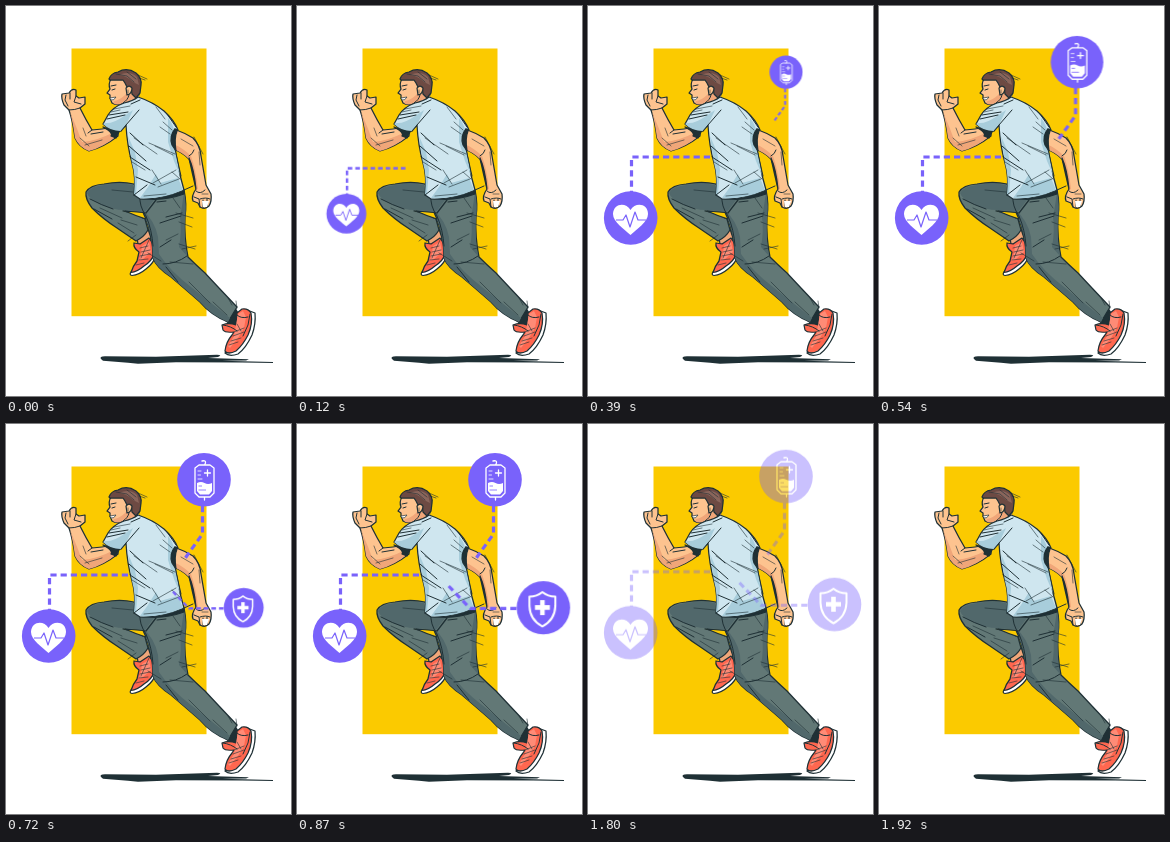
An HTML page that plays this animation: 285 by 390 pixels, repeating every 1950 ms.

```html
<!DOCTYPE html>
<html lang="en">
<head>
<meta charset="utf-8">
<title>Runner with health badges</title>
<style>
  html, body { margin: 0; width: 100%; height: 100%; overflow: hidden; background: #fff; }
  svg { display: block; width: 100%; height: 100%; }

  .ink path { stroke: #1f3035; stroke-width: 1.25; stroke-linejoin: round; stroke-linecap: round; }
  .ink .flat { stroke: none; }
  .ink .line { fill: none; stroke-width: 1; }
  .ink .fine { fill: none; stroke-width: .6; }
  .skin { fill: #fdc38f; }
  .tan { fill: #f0a679; }
  .hair { fill: #6d4a43; }
  .shirt { fill: #cfe6ef; }
  .fold { fill: #a8cddb; }
  .pants { fill: #627876; }
  .shade { fill: #51686b; }
  .dark { fill: #1f3035; }
  .shoe { fill: #ff674f; }
  .glow { fill: #ff8b76; }
  .sole { fill: #fff; }

  .lead { fill: none; stroke: #7962fb; stroke-width: 3.2; stroke-dasharray: 6.2 4; stroke-linejoin: round; }
  .disc { fill: #7962fb; }
  .white { fill: #fff; }
  .wire { fill: none; stroke: #fff; stroke-width: 1.3; stroke-linecap: round; stroke-linejoin: round; }
  .trace { fill: none; stroke: #7962fb; stroke-width: 1.2; stroke-linejoin: round; }

  .badges { animation: leave 1.95s infinite; }
  .heart, .drip, .shield { animation: 1.95s infinite; }
  .heart { transform-origin: 69px 195px; animation-name: heart; }
  .drip { transform-origin: 198px 83px; animation-name: drip; }
  .shield { transform-origin: 212px 184px; animation-name: shield; }

  @keyframes heart {
    0% { transform: scale(0); animation-timing-function: cubic-bezier(.333, .9, .667, 1); }
    15.385%, 100% { transform: scale(1); }
  }
  @keyframes drip {
    0% { transform: scale(0); }
    15.385% { transform: scale(0); animation-timing-function: cubic-bezier(.333, .9, .667, 1); }
    30.769%, 100% { transform: scale(1); }
  }
  @keyframes shield {
    0% { transform: scale(0); }
    30.769% { transform: scale(0); animation-timing-function: cubic-bezier(.333, .9, .667, 1); }
    46.154%, 100% { transform: scale(1); }
  }
  @keyframes leave {
    0%, 83.077% { opacity: 1; transform: none; animation-timing-function: linear; }
    90.769% { opacity: .5; transform: translateY(-3px); animation-timing-function: linear; }
    98.462%, 100% { opacity: 0; transform: translateY(-4.5px); }
  }
</style>
</head>
<body>
<svg viewBox="0 0 285 390">
  <rect x="65.5" y="42.5" width="135" height="267.7" fill="#fbca00"/>

  <!-- ground -->
  <g fill="#1f3035">
    <path d="M95 353Q93 350.500 99 350.2L150 350.7L211 348.8Q217 349 212 351L202 352L243 353.2L240 354.400L216 354.800L267 356V357L236 356.600L170 356.200L132 357.800L122 356.800L97 354.800Z"/>
  </g>

  <g class="ink">
    <!-- rear arm -->
    <path class="skin" d="M168 123Q179 127 187 132Q194 139 195 150L200 179L205 188Q206 195 203 200Q199 204 194 201L192 197L187 195Q185 190 190 183Q188 165 183 153Q176 146 167 143Z"/>
    <path class="tan flat" d="M168 138Q178 143 185 150Q190 164 192 183L190 184Q188 165 183 153Q176 146 167 143Z"/>
    <path class="dark" d="M183 152Q188 163 190 183Q186 166 183 152Z"/>
    <path class="line" d="M183 150Q187 148 188 144M190 185Q194 189 199 184M188 191L193 193L194 201M197 194V202M201 193V201M194 193Q200 191 204 193"/>
    <path class="fine" d="M188 131L197 148M175 133L187 140M193 146L194 159M196 188L202 188"/>
    <path class="sole flat" d="M196 195H203L201 201L197 201Z"/>

    <!-- front foot -->
    <path class="tan" d="M131 232L142 223L145 232L141 238L132 238Z"/>
    <path class="sole" d="M147 238L150 249Q148 257 140 263Q133 269 126 269.500Q123 269 125 266L140 252Z"/>
    <path class="shoe" d="M128 237L134 238L143 232L147 238L148 248Q146 255 138 260Q131 266 125 266.500Q127 260 131 255L133 246Q127 242 128 237Z"/>
    <path class="glow flat" d="M136 240L143 236L145 246L137 253L133 255L135 247Z"/>
    <path class="fine" d="M134 242L142 240M135 246L144 244M134 250L144 248M133 254L142 253M130 259L138 257M143 234L139 243L135 252"/>

    <!-- rear foot -->
    <path class="dark" d="M220 315L229 302L232 307L231 318L224 318Z"/>
    <path class="sole" d="M241 304L249 307Q250 318 246 329Q240 342 232 348Q223 351 219 347L232 334Z"/>
    <path class="shoe" d="M216 319Q223 316 230 319L231 307L236 303Q242 302 245 307Q247 318 242 329Q237 339 230 345Q222 349 219 345Q220 336 226 329L228 326Q219 327 217 324Z"/>
    <path class="glow flat" d="M232 308L237 305L240 311L238 322L232 332L224 342L222 340L228 330Z"/>
    <path class="line" d="M244 308L242 319L237 330M217 319Q225 320 231 325M231 309Q235 313 242 311"/>
    <path class="fine" d="M228 326L238 322M227 330L238 326M225 335L235 332M223 339L232 336M231 318L235 325"/>

    <!-- trousers -->
    <path class="pants" d="M134 188L178 184Q181 198 179 211Q178 232 182 251Q190 259 199 267Q211 280 231 301L222 316Q205 309 194 296Q178 282 165 271Q150 261 147 252Q147 230 139 211Z"/>
    <path class="shade flat" d="M136 203Q149 215 152 231L153 248Q164 265 185 281L224 312L222 316Q205 309 194 296Q178 282 165 271Q150 261 147 252Q147 230 139 211ZM178 186Q181 200 179 213Q178 235 181 250L173 241Q176 225 174 211L176 200Z"/>
    <path class="pants" d="M133 188L128 178Q114 175 98 178Q84 179 80 186Q79 193 86 202Q97 213 111 222L130 235Q138 231 142 224L139 213L126 207L117 205L140 207L150 194Z"/>
    <path class="shade flat" d="M132 189L127 179Q114 176 98 179Q85 180 81 187Q83 193 94 198Q107 204 118 204L139 206L148 194Z"/>
    <path d="M119 205L137 206.500L140 213Q130 210 119 205Z" fill="#fbca00"/>
    <path class="line" d="M134 190Q133 200 140 210Q146 224 147 240M84 193Q95 199 107 203M88 203L106 213M151 196L160 195M157 258Q170 258 181 250M154 241L165 234M160 261L172 276M160 211L176 207M154 217L175 210"/>
    <path d="M134 192Q156 194 178 185L178 188Q156 196 134 192Z" class="dark"/>
    <path class="fine" d="M170 207L187 212M173 216L186 221M173 238L189 243M176 243L190 240M164 256L187 258M183 276L204 297M160 234L172 228M115 214L131 219M112 217L128 227M94 202L116 212M207 296L221 309M167 192L174 202M130 229L122 235M106 184L127 186M142 247L155 255M230 295L231 302M222 292L226 299"/>

    <!-- forearm and fist -->
    <path class="skin" d="M112 117Q105 122 96 123L86 124Q80 114 74 102L79 98L79 91L73 92L70 90L70 84Q66 82 63 87L56 88Q55 92 58 99L63 104Q67 116 69 132Q73 141 83 145Q98 141 112 130Z"/>
    <path class="tan flat" d="M64 106Q71 122 76 136Q91 135 108 126L112 129Q98 141 83 145Q73 141 69 132Q67 116 64 106Z"/>
    <path class="dark" d="M97 121L106 124L114 124L110 132L105 130Q108 127 97 121Z"/>
    <path class="line" d="M60 89L59 94L62 100M64 87L64 93M70 90L68 96L75 98M63 104Q69 104 74 102M86 124L82 127M85 128L97 126"/>
    <path class="fine" d="M74 132L83 140M79 139L96 134M77 122L80 130"/>

    <!-- head -->
    <path class="skin" d="M105 73Q102 78 104 83L101 87L104 89L104 92L106 97Q111 100 117 97L119 101L132 94L134 80L124 70L111 68Z"/>
    <path class="tan flat" d="M108 95Q114 94 119 89L123 84L133 86L133 95L121 99L117 97Q111 100 107 97Z"/>
    <path class="hair" d="M103 73Q105 67 112 66Q121 61 130 67Q136 72 135 79L134 87L130 92L126 88L125 81L121 81L119 77L117 74L104 74Z"/>
    <path class="flat" d="M113 69Q124 64 131 71L133 79L127 76Q121 70 113 69Z" fill="#8a655b"/>
    <path class="skin" d="M120 82Q123 78 126 82Q126 88 121 89Z"/>
    <path class="sole" d="M104 92L110 91Q108 95 105 94Z" style="stroke-width:.7"/>
    <path class="line" d="M105 80L110 79M106 84L109 83M117 97Q122 94 123 89"/>
    <path class="fine" d="M132 69L141 73M133 72L139 74M110 68L121 70L128 76M121 66L130 73M122 84V87"/>

    <!-- shirt -->
    <path class="shirt" d="M132 91Q127 95 118 97Q107 101 102 109L97 118Q104 125 115 125L120 119Q121 139 126 157Q130 170 128 189L134 193Q154 194 178 184L174 169L169 143L166 139Q164 131 169 123L172 124Q168 114 158 105Q147 96 132 91Z"/>
    <path class="fold flat" d="M99 117Q107 118 118 110L127 104L120 119L115 125Q104 125 97 118ZM122 130L129 146L132 164L130 188L128 189Q130 170 126 157ZM162 112Q167 118 168 124L165 132L169 142L174 169L168 155L162 136ZM142 181L150 168L154 177L172 172L177 184Q154 194 134 192Z"/>
    <path class="dark" d="M169 123L171 125Q168 132 170 145L166 139Q163 130 169 123Z"/>
    <path class="line" d="M120 119L133 104M120 119L115 125M124 151L144 164M123 140L140 155M128 189L141 179M130 171L149 179M169 143L175 170M161 108L170 121M125 98L134 94M103 109L122 106M101 113L119 109M178 184L187 180M124 127L137 139"/>
    <path class="fine" d="M108 103L124 100M126 156L139 164M143 137L169 148M149 140L167 149M147 177L170 164M152 181L173 173M138 190L160 188M128 132L151 148M146 164L155 178M157 116L166 124M154 121L164 128M150 101L159 113M166 166L174 173M105 106L114 104"/>
  </g>

  <g class="badges">
    <g class="heart">
      <path class="lead" d="M122 151H43.500V187"/>
      <circle class="disc" cx="42.700" cy="212" r="26.800"/>
      <path class="white" d="M42.500 229C36 223 25 216 25 208C25.500 197 38 196 42.500 204C47 196 60 197 60 208C60 216 49 223 42.500 229Z"/>
      <path class="trace" d="M28 214H35L38 209L42 221L47 206L50 214H58"/>
    </g>

    <g class="drip">
      <path class="lead" d="M196.500 82V110L177.500 136.500"/>
      <circle class="disc" cx="198" cy="55.700" r="26.800"/>
      <path class="wire" d="M196 37Q200 36 199.500 39L198.500 41M193 41H204L208 44V69L204 73H193L189 69V44ZM198.500 73V76"/>
      <path class="white" d="M191 59Q195 57 198.500 59T206 59V67L203 70.500H194L191 67Z"/>
      <path class="wire" d="M201.500 46V52M198.500 49H204.500" stroke-width="2"/>
      <path class="wire" d="M192 47H195M192 51H194.500M192 55H196" style="stroke-width:.8"/>
      <path class="trace" d="M192.500 62H196M192.500 66H200" style="stroke-width:.8"/>
    </g>

    <g class="shield">
      <path class="lead" d="M151.500 162L173 184.500H222"/>
      <circle class="disc" cx="246.500" cy="183.700" r="26.800"/>
      <path class="wire" style="stroke-width:2" d="M245.500 168Q240 172.500 232.500 172.500V182Q233 196 245.500 202.500Q258 196 258.500 182V172.500Q251 172.500 245.500 168Z"/>
      <path class="white" d="M243.200 176H247.800V181.200H253V185.800H247.800V191H243.200V185.800H238V181.200H243.200Z"/>
    </g>
  </g>
</svg>
</body>
</html>
```
